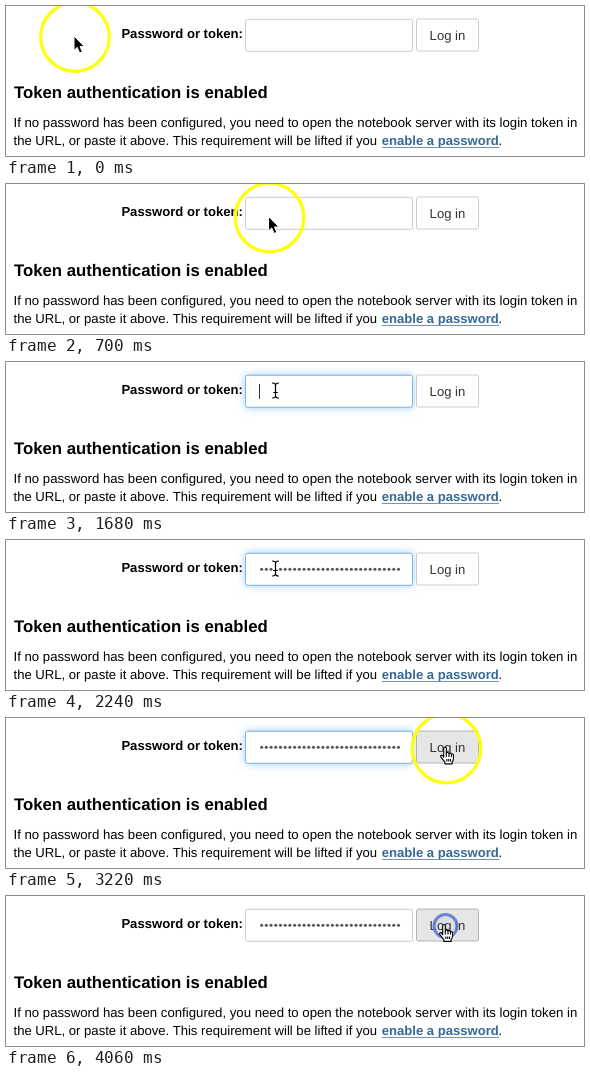
An HTML page for the animation above (4220 ms loop, 578 px wide and 150 px high).

```html
<!DOCTYPE html>
<html lang="en">
<head>
<meta charset="utf-8">
<title>Token login</title>
<style>
  html, body { margin: 0; width: 100%; height: 100%; overflow: hidden; background: #fff; }
  svg { display: block; font-family: "Liberation Sans", Arial, sans-serif; font-size: 13.2px; text-rendering: geometricPrecision; }
  text { fill: #000; white-space: pre; }
  .bold { font-weight: bold; font-size: 13.1px; }
  .heading { font-weight: bold; font-size: 16.75px; }
  .link { fill: #34699a; }
  .field, .button { fill: #fff; stroke: #ccc; }
  .button.hover { fill: #e6e6e6; stroke: #b4b4b4; }
  .label { fill: #333; font-size: 13.1px; }
  #focus { stroke: #7ab9ec; filter: drop-shadow(0 0 4px rgba(102, 175, 233, .6)); }
  #caret { fill: #333; }
  #halo { fill: none; stroke: #ffff0c; stroke-width: 3.2; }
  #ring { fill: #6482d8; fill-opacity: .08; stroke: #5878d0; stroke-opacity: .88; stroke-width: 3; }
</style>
</head>
<body>
<svg width="578" height="150" viewBox="0 0 578 150">
  <text class="bold" x="115.4" y="32">Password or token:</text>
  <rect class="field" x="239.5" y="13.3" width="167" height="32" rx="2"/>
  <rect class="field" id="focus" x="239.5" y="13.3" width="167" height="32" rx="2"/>
  <g id="dots" fill="#555"></g>
  <rect id="caret" y="22" width="1" height="15"/>
  <rect class="button" id="button" x="410.5" y="13" width="62" height="32" rx="2"/>
  <text class="label" x="423.6" y="33.8">Log in</text>

  <text class="heading" x="8" y="91.6">Token authentication is enabled</text>
  <text x="7.5" y="120.9">If no password has been configured, you need to open the notebook server with its login token in</text>
  <text x="7.5" y="139.4" font-size="13.1">the URL, or paste it above. This requirement will be lifted if you</text>
  <text class="bold link" x="375.7" y="139.4">enable a password</text>
  <path d="M376 141.5H493" stroke="#6f95b8"/>
  <text x="492.6" y="139.4">.</text>

  <g id="mouse">
    <circle id="halo" r="34.3"/>
    <circle id="ring"/>
    <path id="arrow" d="M-1-1V13.4L2.2 10.4 4.6 15.9 7.3 14.8 5 9.4H9.3Z" fill="#000" stroke="#fff"/>
    <g id="beam" fill="none" stroke-linecap="round">
      <path d="M-3-7.5Q0-7.5 0-5Q0-7.5 3-7.5M0-5V5M-3 7.5Q0 7.5 0 5Q0 7.5 3 7.5M-1.8 2H1.8" stroke="#fff" stroke-width="2.6"/>
      <path d="M-3-7.5Q0-7.5 0-5Q0-7.5 3-7.5M0-5V5M-3 7.5Q0 7.5 0 5Q0 7.5 3 7.5M-1.8 2H1.8" stroke="#000" stroke-width="1.2"/>
    </g>
    <g id="hand" stroke="#000" stroke-width="1.1" stroke-linejoin="round">
      <path fill="#fff" d="M-2.8 7.5V0Q-2.8-1.5-1.5-1.5T-.2 0V5Q.2 4 1.2 4T2.5 5.3Q3 4.4 3.9 4.6T5 6Q5.5 5.3 6.2 5.6T7 7V10Q7 12 5.6 13.4V15.4H-1.6V13.6L-5.8 8.4Q-6.2 7-5 6.7T-2.8 8.8Z"/>
      <path fill="none" d="M-.2 5V8.5M2.5 5.3V8.5M5 6V8.5M.4 10.5V13M2.2 10.5V13M4 10.5V13"/>
    </g>
  </g>
</svg>
<script>
  const LOOP = 4220, STEP = 140;
  const $ = id => document.getElementById(id);
  const show = (id, on) => { $(id).style.display = on ? "" : "none"; };
  const within = (t, a, b) => t >= a && t < b;

  // time, x, y: the pointer holds each place until the next
  const track = [
    [0, 69, 31], [140, 98, 31], [280, 148, 32], [420, 194, 33], [560, 230, 34],
    [700, 263.5, 33.5], [840, 269.5, 28.5], [2660, 295, 30], [2800, 352, 35],
    [2940, 400.5, 40.5], [3080, 430, 34], [3220, 440.5, 30.5], [3920, 439.5, 30]
  ];
  const carets = [[1400, 2240], [2660, 3220], [3780, 3920]];
  const PASTE = 1820;

  for (let i = 0; i < 30; i++) {
    const dot = document.createElementNS("http://www.w3.org/2000/svg", "circle");
    dot.setAttribute("cx", 255.6 + i * 4.72);
    dot.setAttribute("cy", 29.3);
    dot.setAttribute("r", 1.55);
    $("dots").append(dot);
  }

  function glow(t) {
    if (t < 1540 || t >= 4060) return 0;
    return t < 1680 || t >= 3920 ? .6 : 1;
  }

  function ringSize(t) {
    if (within(t, 1120, 1260) || within(t, 3920, 4060)) return 8.5;
    return within(t, 1260, 1400) || t >= 4060 ? 11.5 : 0;
  }

  function draw(t) {
    const [, x, y] = track.findLast(p => p[0] <= t);
    $("mouse").setAttribute("transform", `translate(${x} ${y})`);
    show("halo", t < 980 || within(t, 2940, 3920));
    show("arrow", t < 840);
    show("beam", within(t, 840, 3080));
    show("hand", t >= 3080);

    const r = ringSize(t);
    show("ring", r);
    $("ring").setAttribute("r", r);

    $("focus").style.opacity = glow(t);
    show("dots", t >= PASTE);
    show("caret", carets.some(([a, b]) => within(t, a, b)));
    $("caret").setAttribute("x", t < PASTE ? 253 : 394);
    $("button").classList.toggle("hover", t >= 3080);
  }

  const start = performance.now();
  function tick() {
    const t = (performance.now() - start) % LOOP;
    draw(Math.min(Math.floor(t / STEP) * STEP, 4060));
    requestAnimationFrame(tick);
  }
  tick();
</script>
</body>
</html>
```
